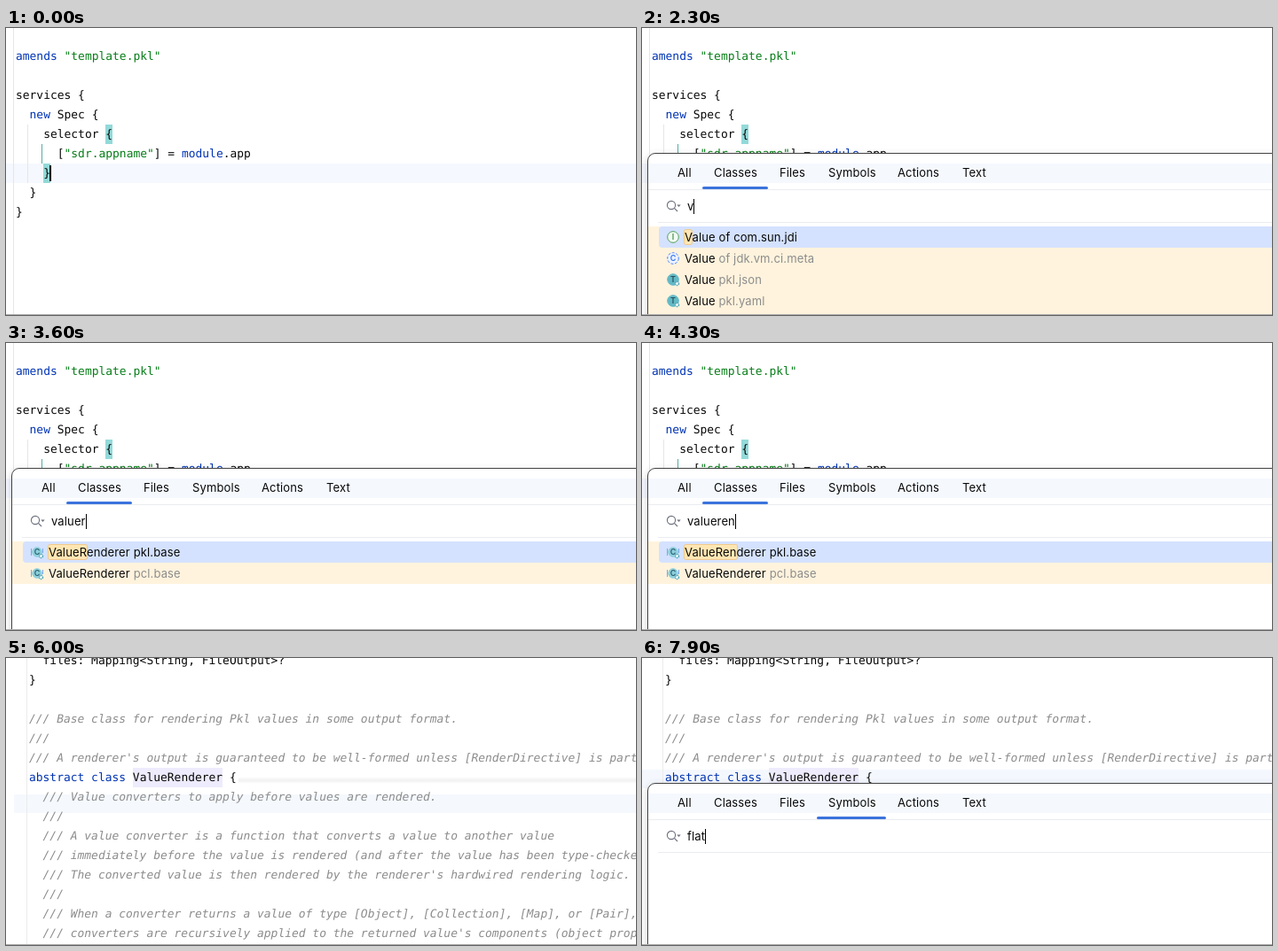
An HTML page that plays this animation: 710 by 324 pixels, repeating every 8 s.

```html
<!DOCTYPE html>
<html lang="en">
<head>
<meta charset="utf-8">
<title>Class search</title>
<style>
html, body { margin: 0; width: 100%; height: 100%; overflow: hidden; background: #fff; }
#stage { position: relative; width: 710px; height: 324px; overflow: hidden; background: #fff; }
#stage div, #stage svg { position: absolute; }
.code { white-space: pre; font: 12.956px/23px "DejaVu Sans Mono", monospace; color: #080808;
  text-rendering: geometricPrecision; }
.code b { font-weight: 400; color: #0033b3; }
.code q { quotes: none; color: #067d17; }
.code i { color: #8c8c8c; }
.code u { text-decoration: none; background: #93d9d9; display: inline-block; height: 22px; }
.code s { text-decoration: none; background: #edebfc; display: inline-block; height: 22px; }
.ui { white-space: pre; font: 13px/24px Inter, sans-serif; letter-spacing: .01em; color: #080808; }
.ui i { font-style: normal; color: #8c8c8c; }
.ui mark { color: inherit; background: #ffe6b3; border-radius: 2px; box-shadow: 0 0 0 1px #efca8e; }
.ui .sel { background: #d4e2ff; padding: 1px 0; }
.popup { left: 6px; top: 141px; width: 760px; height: 240px; box-sizing: border-box; background: #fff;
  border: 1px solid #444; border-radius: 9px; box-shadow: 0 3px 10px rgba(0,0,0,.2); }
</style>
</head>
<body>
<div id="stage"></div>
<script>
const LOOP = 8000;
const OPEN = 1300, RESULTS = 2100, ENTER = 4500, REOPEN = 6100;
const typing = [
  [1300, "v"], [2600, "va"], [2750, "val"], [2900, "valu"], [3100, "value"],
  [3500, "valuer"], [3750, "valuere"], [4000, "valueren"],
  [6100, ""], [6800, "f"], [7100, "fl"], [7400, "fla"], [7700, "flat"]
];
const tabs = [["All", 40], ["Classes", 81], ["Files", 155], ["Symbols", 210], ["Actions", 288], ["Text", 361]];

const specCode = [
  '<b>amends</b> <q>"template.pkl"</q>', '', 'services {', '  <b>new</b> Spec {', '    selector <u>{</u>',
  '      [<q>"sdr.appname"</q>] = <b>module</b>.app', '    <u>}</u>', '  }', '}'
];
const note = text => `<i>/// ${text}</i>`;
const baseCode = [
  '  files: Mapping&lt;String, FileOutput&gt;?', '}', '',
  note("Base class for rendering Pkl values in some output format."), note(""),
  note("A renderer's output is guaranteed to be well-formed unless [RenderDirective] is part of"),
  '<b>abstract</b> <b>class</b> <s>ValueRenderer</s> {',
  ...["Value converters to apply before values are rendered.", "",
    "A value converter is a function that converts a value to another value",
    "immediately before the value is rendered (and after the value has been type-checked).",
    "The converted value is then rendered by the renderer's hardwired rendering logic.", "",
    "When a converter returns a value of type [Object], [Collection], [Map], or [Pair],",
    "converters are recursively applied to the returned value's components (object properties"
  ].map(text => "  " + note(text))
];

const valueRows = [["I", "Value", "of com.sun.jdi"], ["C", "Value", "of jdk.vm.ci.meta"],
  ["T", "Value", "pkl.json"], ["T", "Value", "pkl.yaml"]];
const rendererRows = [["P", "ValueRenderer", "pkl.base"], ["P", "ValueRenderer", "pcl.base"]];

const box = (x, y, w, h, fill, extra = "") =>
  `<div style="left:${x}px;top:${y}px;width:${w}px;height:${h}px;background:${fill};${extra}"></div>`;
const label = (kind, x, y, html) => `<div class="${kind}" style="left:${x}px;top:${y}px">${html}</div>`;
const lines = (rows, x, y) => rows.map((row, i) => label("code", x, y + 22 * i, row)).join("");

function icon(kind, y) {
  const letter = kind === "P" ? "C" : kind;
  const [fill, ring, ink, dash] = {
    I: ["#f2fcf3", "#4f9d57", "#3f8f49", ""],
    C: ["#edf3ff", "#4682fa", "#3574f0", "3 1.6"],
    T: ["#62b9c6", "#62b9c6", "#25525c", ""],
    P: ["#8fd0de", "#8fd0de", "#29606c", ""]
  }[kind];
  const bars = kind === "P" ? '<path d="M1.5 4v8M14.5 4v5" stroke="#7aa7e8"/>' : "";
  const gear = "TP".includes(kind)
    ? '<circle cx="12.5" cy="12.5" r="2" fill="#fff" stroke="#4aa3b5" stroke-width="1.4" stroke-dasharray="1.4 .7"/>' : "";
  return `<svg width="16" height="16" style="left:27px;top:${y}px">${bars}
    <circle cx="8" cy="8" r="${kind === "P" ? 5.3 : 6.3}" fill="${fill}" stroke="${ring}" stroke-dasharray="${dash}"/>
    <text x="8" y="11.3" text-anchor="middle" font-family="Inter, sans-serif" font-size="9" font-weight="600" fill="${ink}">${letter}</text>${gear}</svg>`;
}

function resultList(rows, matched) {
  const height = rows.length > 2 ? 100 : 48;
  return box(7, 224, 703, height, "#fff3dd") + box(19, 224, 700, 24, "#d4e2ff", "border-radius:4px") +
    rows.map(([kind, name, place], i) => {
      const y = 224 + 24 * i;
      const text = i ? `${name} <i>${place}</i>`
        : `<mark>${name.slice(0, matched)}</mark>${name.slice(matched)} ${place}`;
      return icon(kind, y + 4) + label("ui", 48, y, text);
    }).join("");
}

function popup(query, selected, activeTab, results) {
  const [lineX, lineW] = activeTab === "Classes" ? [68, 74] : [197, 78];
  const text = selected ? `<span class="sel">${query}</span>` : query;
  const caret = '<span style="display:inline-block;width:1px;height:17px;margin-right:-1px;vertical-align:-4px;background:#000"></span>';
  return '<div class="popup"></div>' + box(7, 153, 703, 22, "#f5f9fe") +
    tabs.map(([name, x]) => label("ui", x, 151, name)).join("") +
    box(7, 182, 703, 1, "#ebecf0") + box(lineX, 179, lineW, 3, "#3b73dd", "border-radius:2px") +
    `<svg width="20" height="16" style="left:27px;top:193px" fill="none" stroke="#6c707e" stroke-width="1.1">
      <circle cx="6" cy="7" r="4.6"/><path d="M9.4 10.4L13 14"/><path d="M12.3 6.6h4.4l-2.2 2.4z" fill="#6c707e" stroke="none"/></svg>` +
    label("ui", 51, 189, text + caret) + box(18, 219, 692, 1, "#ebecf0") + results;
}

function specEditor(t) {
  const caretOn = t < 600 || t >= 1100;
  return box(0, 153, 710, 22, "#f5f8fe") + box(8, 0, 1, 323, "#e6e6e6") +
    box(24, 109, 1, 66, "#e6e6e6") + box(40, 131, 1, 22, "#58aca3") + lines(specCode, 11, 21) +
    (caretOn ? box(49, 155, 2, 18, "#000") : "");
}

function baseEditor(t) {
  const back = t >= REOPEN ? box(0, 126, 710, 21, "#f4f8fe")
    : box(9, 154, 701, 21, "#f5f9fe") + box(262, 134, 448, 8, "linear-gradient(#fff,#f1f1f1,#fff)");
  return back + box(23, 0, 1, 323, "#ebebeb") + lines(baseCode, 26, -8);
}

function scene(t) {
  const query = typing.filter(([at]) => at <= t).map(([, text]) => text).pop() ?? "";
  let html = t < ENTER ? specEditor(t) : baseEditor(t);
  if (t >= OPEN && t < ENTER) {
    // Result highlighting trails the typed text slightly.
    const matched = query === "value" && t < 3200 ? 4 : query.length;
    const rows = query.length > 5 ? rendererRows : valueRows;
    html += popup(query, t < RESULTS, "Classes", t >= RESULTS ? resultList(rows, matched) : "");
  }
  if (t >= REOPEN) html += popup(query, false, "Symbols", "");
  return html + box(0, 323, 710, 1, "#adadad");
}

const stage = document.getElementById("stage");
const start = performance.now();
let shown = "";
function tick() {
  const html = scene((performance.now() - start) % LOOP);
  if (html !== shown) stage.innerHTML = shown = html;
  requestAnimationFrame(tick);
}
tick();
</script>
</body>
</html>
```
